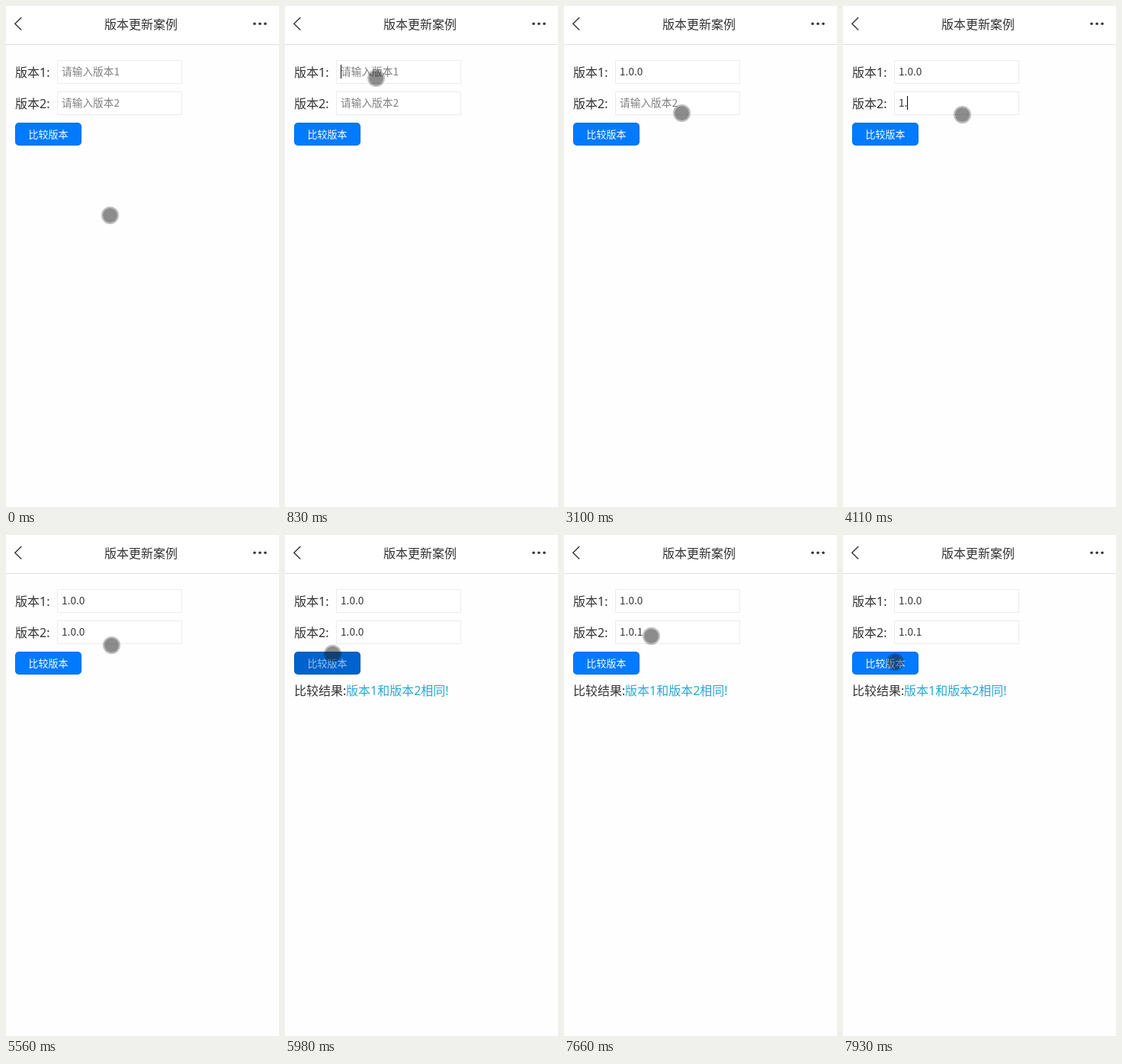
Write an HTML page with a canvas that moves like this. It is 358 by 657 pixels and loops after 7.99 s.

```html
<!DOCTYPE html>
<html lang="zh-CN">
<head>
<meta charset="utf-8">
<title>版本更新案例</title>
<style>
html, body { margin: 0; width: 100%; height: 100%; overflow: hidden; background: #fefefe; }
canvas { display: block; }
</style>
</head>
<body>
<canvas id="stage" width="358" height="657"></canvas>
<script>
const LOOP = 7990;
const PAGE_FONT = '"Noto Sans", "Noto Sans CJK SC", "Noto Sans CJK", sans-serif';
const INPUT_FONT = '"Noto Sans CJK SC", "Noto Sans CJK", sans-serif';
const ctx = document.getElementById('stage').getContext('2d');

const linear = u => u;
const smooth = u => u * u * (3 - 2 * u);
const easeIn = u => u * u;
const easeOut = u => u * (2 - u);

// Pointer stops: time, x, y, easing used to arrive there
const pointerPath = [
  [0, 136, 274],
  [180, 136, 274],
  [620, 120, 95, smooth],
  [810, 120, 95],
  [830, 119, 94],
  [2110, 119, 94],
  [2120, 116, 91],
  [2830, 116, 91],
  [3130, 155, 141, smooth],
  [3310, 155, 141],
  [3320, 156, 142],
  [5470, 156, 142],
  [5800, 62, 155, smooth],
  [6070, 62, 155],
  [6250, 109, 124, easeIn],
  [6310, 120, 122, linear],
  [6370, 128, 126, easeOut],
  [7420, 128, 126],
  [7520, 132, 118, easeOut],
  [7920, 68, 166, smooth]
];

// Input states: time, value, caret visible
const fields = [
  { y: 71, label: '版本1:', hint: '请输入版本1', states: [
    [0, '', false], [830, '', true], [1300, '', false],
    [1510, '1', true], [1760, '1.', true], [1940, '1.0', true],
    [2120, '1.0.', true], [2330, '1.0.0', true], [2830, '1.0.0', false]
  ] },
  { y: 112, label: '版本2:', hint: '请输入版本2', states: [
    [0, '', false], [3320, '', true], [3780, '', false],
    [3930, '1', true], [4110, '1.', true], [4370, '1.0', true],
    [4580, '1.0.', true], [4970, '1.0.0', true], [5470, '1.0.0', false],
    [6550, '1.0.0', true], [6950, '1.0.', true], [7040, '1.0.1', true],
    [7540, '1.0.1', false]
  ] }
];

function text(str, x, y, size, color, align = 'left', font = PAGE_FONT) {
  ctx.font = `${size}px ${font}`;
  ctx.fillStyle = color;
  ctx.textAlign = align;
  ctx.fillText(str, x, y);
}

function disc(x, y, r, color) {
  ctx.fillStyle = color;
  ctx.beginPath();
  ctx.arc(x, y, r, 0, Math.PI * 2);
  ctx.fill();
}

function drawHeader() {
  ctx.fillStyle = '#fff';
  ctx.fillRect(0, 0, 358, 50);
  ctx.fillStyle = '#dedede';
  ctx.fillRect(0, 50, 358, 1);
  ctx.strokeStyle = '#333';
  ctx.lineWidth = 1.4;
  ctx.beginPath();
  ctx.moveTo(20.2, 15);
  ctx.lineTo(11.8, 23.2);
  ctx.lineTo(20.2, 31.4);
  ctx.stroke();
  for (const x of [326, 333, 340]) disc(x, 23.3, 1.75, '#333');
  text('版本更新案例', 177, 30, 16, '#333', 'center');
}

function drawField({ y, label, hint, states }, t) {
  const [, value, caret] = states.findLast(s => s[0] <= t);
  text(label, 12, y + 22, 16, '#333');
  ctx.fillStyle = '#fff';
  ctx.fillRect(67, y, 164, 31);
  ctx.strokeStyle = '#ebebeb';
  ctx.lineWidth = 1;
  ctx.strokeRect(67.5, y + 0.5, 163, 30);
  text(value || hint, 73, y + 20, 13.7, value ? '#333' : '#808080', 'left', INPUT_FONT);
  if (caret) {
    const x = Math.floor(73 + ctx.measureText(value).width);
    ctx.fillStyle = '#000';
    ctx.fillRect(x, y + 6, 1, 18);
  }
}

function drawButton(t) {
  const pressed = t >= 5880 && t < 6070;
  ctx.fillStyle = pressed ? '#0062cc' : '#007aff';
  ctx.beginPath();
  ctx.roundRect(12, 153, 87, 30, 5);
  ctx.fill();
  ctx.strokeStyle = 'rgba(0, 0, 0, 0.12)';
  ctx.lineWidth = 1;
  ctx.beginPath();
  ctx.roundRect(12.5, 153.5, 86, 29, 4.5);
  ctx.stroke();
  text('比较版本', 55.5, 173, 13, pressed ? 'rgba(255, 255, 255, 0.6)' : '#fff', 'center');
}

function drawResult() {
  text('比较结果:', 12, 210, 16, '#333');
  text('版本1和版本2相同!', 80, 210, 16, '#2aa8d4');
}

function pointerAt(t) {
  const i = pointerPath.findIndex(p => p[0] > t);
  if (i < 0) return pointerPath.at(-1).slice(1, 3);
  const [t0, x0, y0] = pointerPath[i - 1];
  const [t1, x1, y1, ease = linear] = pointerPath[i];
  const u = ease((t - t0) / (t1 - t0));
  return [Math.round(x0 + (x1 - x0) * u), Math.round(y0 + (y1 - y0) * u)];
}

function drawPointer(t) {
  const [x, y] = pointerAt(t).map(v => v + 0.5);
  disc(x, y, 9.5, 'rgba(30, 30, 30, 0.51)');
  ctx.strokeStyle = 'rgba(0, 0, 0, 0.25)';
  ctx.lineWidth = 2;
  ctx.beginPath();
  ctx.arc(x, y, 10.5, 0, Math.PI * 2);
  ctx.stroke();
}

function draw(t) {
  ctx.fillStyle = '#fefefe';
  ctx.fillRect(0, 0, 358, 657);
  drawHeader();
  for (const field of fields) drawField(field, t);
  drawButton(t);
  if (t >= 5980) drawResult();
  drawPointer(t);
}

const start = performance.now();
function tick() {
  draw((performance.now() - start) % LOOP);
  requestAnimationFrame(tick);
}
tick();
</script>
</body>
</html>
```
